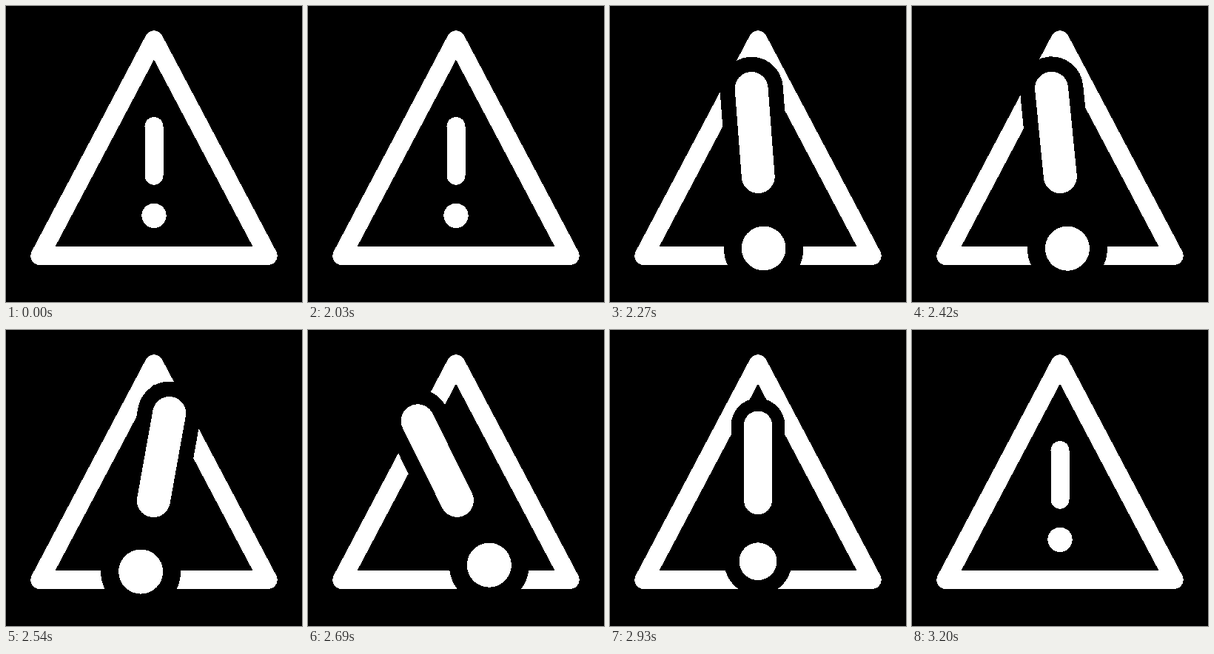
An HTML page for the animation above (3.26 s loop, 400 by 400 pixels).

```html
<!DOCTYPE html>
<html lang="en">
<head>
<meta charset="utf-8">
<title>Warning</title>
<style>
  html, body { margin: 0; height: 100%; overflow: hidden; background: #000; }
  svg { display: block; width: 100vw; height: 100vh; shape-rendering: crispEdges; }
  path { fill: none; stroke-linecap: round; stroke-linejoin: round; }
</style>
</head>
<body>
<svg viewBox="0 0 400 400">
  <path d="M200 45.83 L354.17 337.5 H45.83 Z" stroke="#fff" stroke-width="25"/>
  <g id="mark">
    <path d="M200 162.5 V229.17" stroke="#000" stroke-width="47.6"/>
    <circle cx="200" cy="283.33" r="30"/>
    <path d="M200 162.5 V229.17" stroke="#fff" stroke-width="25"/>
    <circle cx="200" cy="283.33" r="16.67" fill="#fff"/>
  </g>
</svg>
<script>
const LOOP = 3260, REST = 2000, STEP = 30;
const PIVOT_Y = 227.3;
const mark = document.getElementById('mark');

// Keys are [step, value] pairs, joined by sine easing.
const SCALE = [[1, 1], [9.5, 1.8], [25, 1.8], [40, 1]];
const ANGLE = [[1, 0], [6.54, 20], [11.54, -30], [16.54, 20], [21.54, -30], [28, 0]];

function valueAt(keys, step) {
  const next = keys.findIndex(([at]) => at > step);
  if (next === 0) return keys[0][1];
  if (next < 0) return keys[keys.length - 1][1];
  const [from, a] = keys[next - 1], [to, b] = keys[next];
  const ease = (1 - Math.cos(Math.PI * (step - from) / (to - from))) / 2;
  return a + (b - a) * ease;
}

function draw(now) {
  const time = now % LOOP;
  const step = Math.min(40, Math.max(0, Math.floor((time - REST) / STEP)));
  mark.setAttribute('transform',
    `translate(200 ${PIVOT_Y}) rotate(${valueAt(ANGLE, step)}) ` +
    `scale(${valueAt(SCALE, step)}) translate(-200 ${-PIVOT_Y})`);
}

const start = performance.now();
function tick() {
  draw(performance.now() - start);
  requestAnimationFrame(tick);
}
tick();
</script>
</body>
</html>
```
